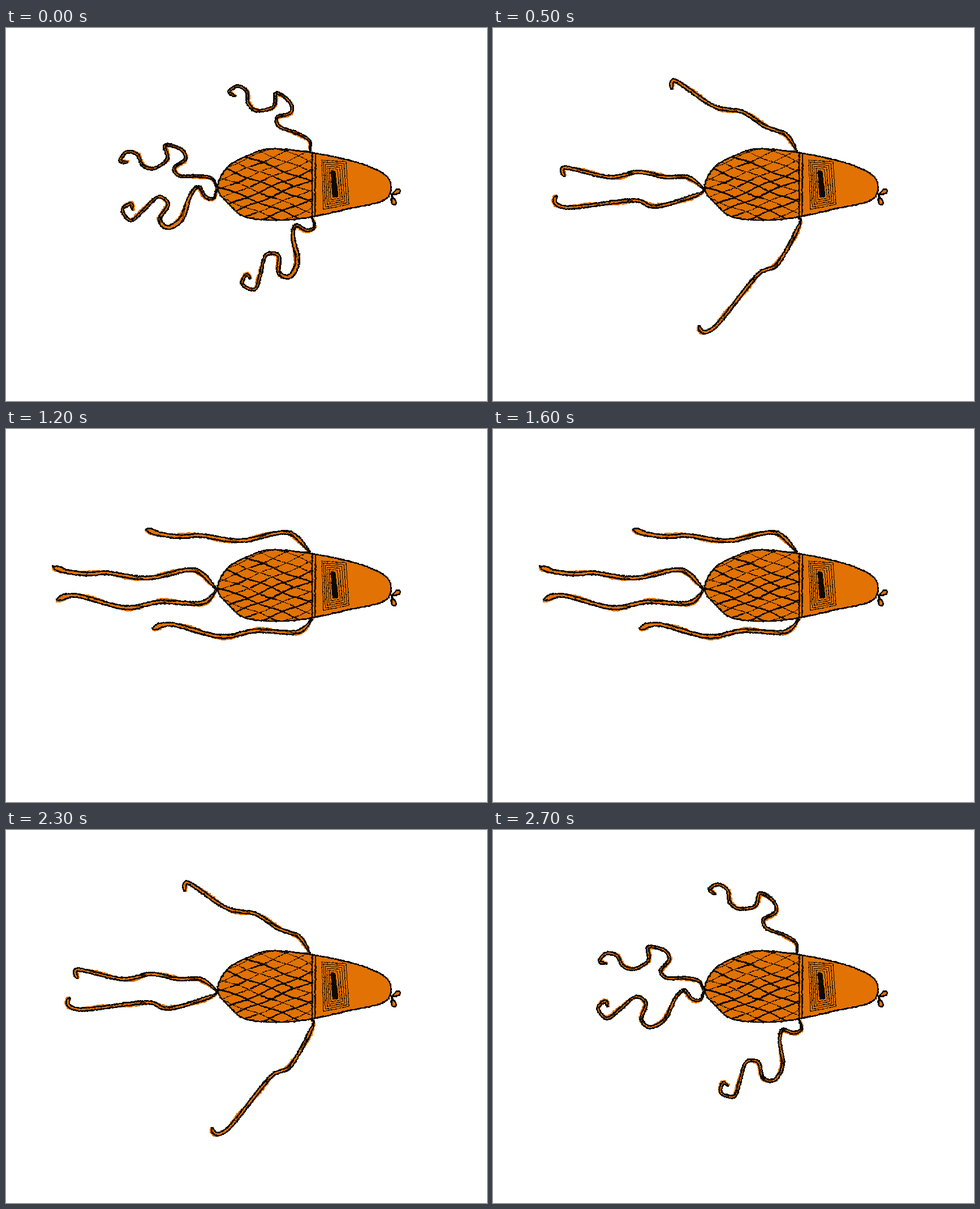
These frames come from a looping animation (850 px wide and 658 px high, 2800 ms). An HTML page with a canvas:

```html
<!DOCTYPE html>
<html lang="en">
<head>
<meta charset="utf-8">
<title>Swimming creature</title>
<style>
html, body { margin: 0; width: 100%; height: 100%; overflow: hidden; background: #fff; }
canvas { display: block; }
</style>
</head>
<body>
<canvas id="stage" width="850" height="658"></canvas>
<script>
const ctx = document.getElementById('stage').getContext('2d');
const ORANGE = '#e17203', INK = '#0d0a06';
const STEP = 100, COUNT = 28, SEGS = 160;
const HOOKED = 5, OPEN = 8, WIDEST = 7, CLOSED = 12; // steps of the stroke

let seed = 1;
const rnd = () => (seed = seed * 16807 % 2147483647) / 2147483647;
const mix = (a, b, t) => a + (b - a) * t;
const clamp = t => Math.max(0, Math.min(1, t));
const smooth = t => t * t * (3 - 2 * t);
const bump = (u, at, width) => Math.exp(-(((u - at) / width) ** 2));
const dist = (a, b) => Math.hypot(b[0] - a[0], b[1] - a[1]);
const lengthOf = pts => pts.slice(1).reduce((s, p, i) => s + dist(pts[i], p), 0);

// Catmull-Rom through flat x,y pairs
function spline(flat, closed) {
  const p = [], out = [];
  for (let i = 0; i < flat.length; i += 2) p.push([flat[i], flat[i + 1]]);
  const n = p.length;
  const at = i => closed ? p[(i + n) % n] : p[Math.max(0, Math.min(n - 1, i))];
  const last = closed ? n : n - 1;
  for (let i = 0; i < last; i++) {
    const [a, b, c, d] = [at(i - 1), at(i), at(i + 1), at(i + 2)];
    for (let k = 0; k < 12; k++) {
      const t = k / 12;
      out.push([0, 1].map(j => b[j] + t / 2 * (c[j] - a[j] +
        t * (2 * a[j] - 5 * b[j] + 4 * c[j] - d[j] + t * (3 * (b[j] - c[j]) + d[j] - a[j])))));
    }
  }
  out.push(at(last));
  return out;
}

// n equal pieces along a polyline
function resample(pts, n) {
  const step = lengthOf(pts) / n, out = [pts[0]];
  let run = 0;
  for (let i = 1; i < pts.length; i++) {
    const a = pts[i - 1], b = pts[i], d = dist(a, b);
    while (out.length < n && run + d >= out.length * step) {
      const t = (out.length * step - run) / d;
      out.push([mix(a[0], b[0], t), mix(a[1], b[1], t)]);
    }
    run += d;
  }
  out.push(pts[pts.length - 1]);
  return out;
}

// Grainy crayon line
function crayon(pts, w, color = INK, spread = 1) {
  ctx.fillStyle = color;
  for (const [x, y] of resample(pts, Math.max(2, Math.ceil(lengthOf(pts))))) {
    const s = w + (rnd() < spread / 4 ? 1 : 0);
    ctx.fillRect(Math.round(x - s / 2 + (rnd() - 0.5) * spread),
                 Math.round(y - s / 2 + (rnd() - 0.5) * spread), s, s);
  }
}

function trace(pts) {
  ctx.beginPath();
  pts.forEach(p => ctx.lineTo(p[0], p[1]));
  ctx.closePath();
}

function fill(pts, color) {
  trace(pts);
  ctx.fillStyle = color;
  ctx.fill();
}

// A pose is a length and headings along the limb, so that blending uncurls it
function pose(flat) {
  const line = spline(flat), pts = resample(line, SEGS), turn = [];
  for (let i = 0; i < SEGS; i++) {
    const a = Math.atan2(pts[i + 1][1] - pts[i][1], pts[i + 1][0] - pts[i][0]);
    const laps = i ? Math.round((turn[i - 1] - a) / (2 * Math.PI)) : 0;
    turn.push(a + laps * 2 * Math.PI);
  }
  return { len: lengthOf(line), turn };
}

const upper = {
  curled: pose([373,284, 366,267, 340,262, 308,262, 298,248, 318,232, 310,215, 282,208, 286,232, 262,249, 242,243, 233,224, 214,220, 203,235, 216,238]),
  hooked: pose([373,282, 345,262, 305,262, 258,253, 207,262, 135,246, 123,249, 127,261]),
  open: pose([372,283, 345,254, 318,249, 250,263, 180,254, 145,256, 110,252, 83,243]),
  bulge: 0,
  spread: [20, 22]
};
const lower = {
  curled: pose([373,285, 368,301, 354,299, 341,281, 326,298, 312,337, 287,353, 273,338, 288,312, 270,299, 244,323, 222,341, 207,322, 222,311, 224,321]),
  hooked: pose([372,284, 363,293, 288,315, 248,304, 145,316, 116,313, 109,304, 113,296]),
  open: pose([372,284, 345,307, 272,305, 210,315, 125,294, 90,301]),
  bulge: 1.8,
  spread: [-31, -50]
};
// Front limbs are the back ones swung about their own root
const limbs = [
  { kind: upper, root: [372, 283], swing: 0 },
  { kind: lower, root: [372, 284], swing: 0 },
  { kind: upper, root: [537, 217], swing: 1 },
  { kind: lower, root: [541, 335], swing: 1 }
];

function spreadAt([from, to], f) {
  const deg = f < WIDEST ? mix(from, to, f / WIDEST)
    : to * (1 - clamp((f - WIDEST) / (CLOSED - WIDEST))) ** 2;
  return deg * Math.PI / 180;
}

function limbLine({ kind, root, swing }, f) {
  const [a, b, u] = f < HOOKED ? [kind.curled, kind.hooked, f / HOOKED]
    : [kind.hooked, kind.open, clamp((f - HOOKED) / (OPEN - HOOKED))];
  const t = smooth(u), step = mix(a.len, b.len, t) / SEGS;
  const swung = swing * spreadAt(kind.spread, f);
  let [x, y] = root;
  return [root, ...a.turn.map((h, i) => {
    const dir = mix(h, b.turn[i], t) + swung;
    return [x += Math.cos(dir) * step, y += Math.sin(dir) * step];
  })];
}

function drawLimb(limb, f) {
  const mid = limbLine(limb, f), phase = rnd() * 6;
  const opened = clamp(f / OPEN);
  const half = u => (mix(2, 3, opened) + limb.kind.bulge * bump(u, 0.37, 0.15) * Math.exp(-2 * f)
    + 1.2 * opened ** 4 * bump(u, 0.96, 0.03)) * Math.min(1, 0.3 + u * 8, 0.3 + (1 - u) * 40);
  const side = off => mid.map((p, i) => {
    const a = mid[Math.max(0, i - 1)], b = mid[Math.min(SEGS, i + 1)], d = dist(a, b);
    const o = off(i / SEGS) / d;
    return [p[0] + (b[1] - a[1]) * o, p[1] - (b[0] - a[0]) * o];
  });
  const left = side(half), right = side(u => -half(u));
  crayon(side(u => (half(u) + 1) * Math.sin(u * 14 + phase)), 3, ORANGE, 2);
  for (let i = 0; i < SEGS; i++) fill([left[i], left[i + 1], right[i + 1], right[i]], ORANGE);
  crayon(mid, 2, ORANGE);
  crayon(left, 2);
  crayon(right, 2);
  crayon([left[SEGS], right[SEGS]], 2);
  // stray strokes inside the band
  const inner = side(u => half(u) * Math.sin(u * 19 + phase));
  for (let i = 12; i < SEGS - 20; i += 32) crayon(inner.slice(i, i + 22), 1);
}

const outline = spline([374,282, 392,245, 430,224, 470,213, 541,220, 620,237, 670,259, 680,285, 665,305, 605,319, 541,333, 485,339, 425,334, 395,312], true);
const EDGE = 541; // where the shell ends

// Wavering line that meets the shell edge at height y
function netLine(y, slope) {
  const bend = rnd() * 6, pts = [];
  for (let x = 370; x <= EDGE; x += 9) {
    pts.push([x, y + (x - EDGE) * slope + 1.5 * Math.sin(x / 12 + bend)]);
  }
  crayon(pts, 1 + Math.round(rnd()), INK, 0.8);
  const from = Math.floor(rnd() * 14);
  crayon(pts.slice(from, from + 4), 2);
}

function petal(angle) {
  const pts = [], c = Math.cos(angle), s = Math.sin(angle);
  for (let t = 0; t < 6.3; t += 0.3) {
    const r = (1 - Math.cos(t)) / 2, along = 18 * r, across = 6 * r * Math.sin(t);
    pts.push([681 + along * c - across * s, 295 + along * s + across * c]);
  }
  fill(pts, ORANGE);
  crayon(pts, 2);
}

function drawBody() {
  seed = 77;
  fill(outline, ORANGE);
  ctx.save();
  trace(outline);
  ctx.clip();
  for (let i = 0; i < 8; i++) netLine(236 + i * 18, 0.39);
  for (let i = -2; i < 7; i++) netLine(216 + i * 17, -0.42);
  ctx.restore();
  crayon(outline, 2);
  crayon([[EDGE, 219], [EDGE, 332]], 2);
  crayon([[EDGE + 6, 221], [EDGE + 5, 330]], 2);

  // nested frames around a dark core
  const outer = [[558, 233], [601, 236], [606, 311], [561, 320]];
  const core = [[575, 252], [581, 253], [586, 297], [578, 298]];
  for (let k = 0; k < 5; k++) {
    const q = outer.map((p, i) => p.map((v, j) => mix(v, core[i][j], k / 5.2)));
    crayon([...q, q[0]], 1, INK, 0.3);
  }
  fill(core, INK);
  crayon([...core, core[0]], 2);

  petal(-0.56);
  petal(1.2);
  crayon([[679, 290], [684, 298]], 2);
}

let shown = -1;
function tick() {
  const i = Math.floor(performance.now() / STEP) % COUNT;
  if (i !== shown) {
    shown = i;
    const f = Math.min(i, COUNT - i); // swings out and back
    ctx.fillStyle = '#fff';
    ctx.fillRect(0, 0, 850, 658);
    limbs.forEach((limb, n) => {
      seed = 1000 + f * 131 + n * 17;
      drawLimb(limb, f);
    });
    drawBody();
  }
  requestAnimationFrame(tick);
}
tick();
</script>
</body>
</html>
```
